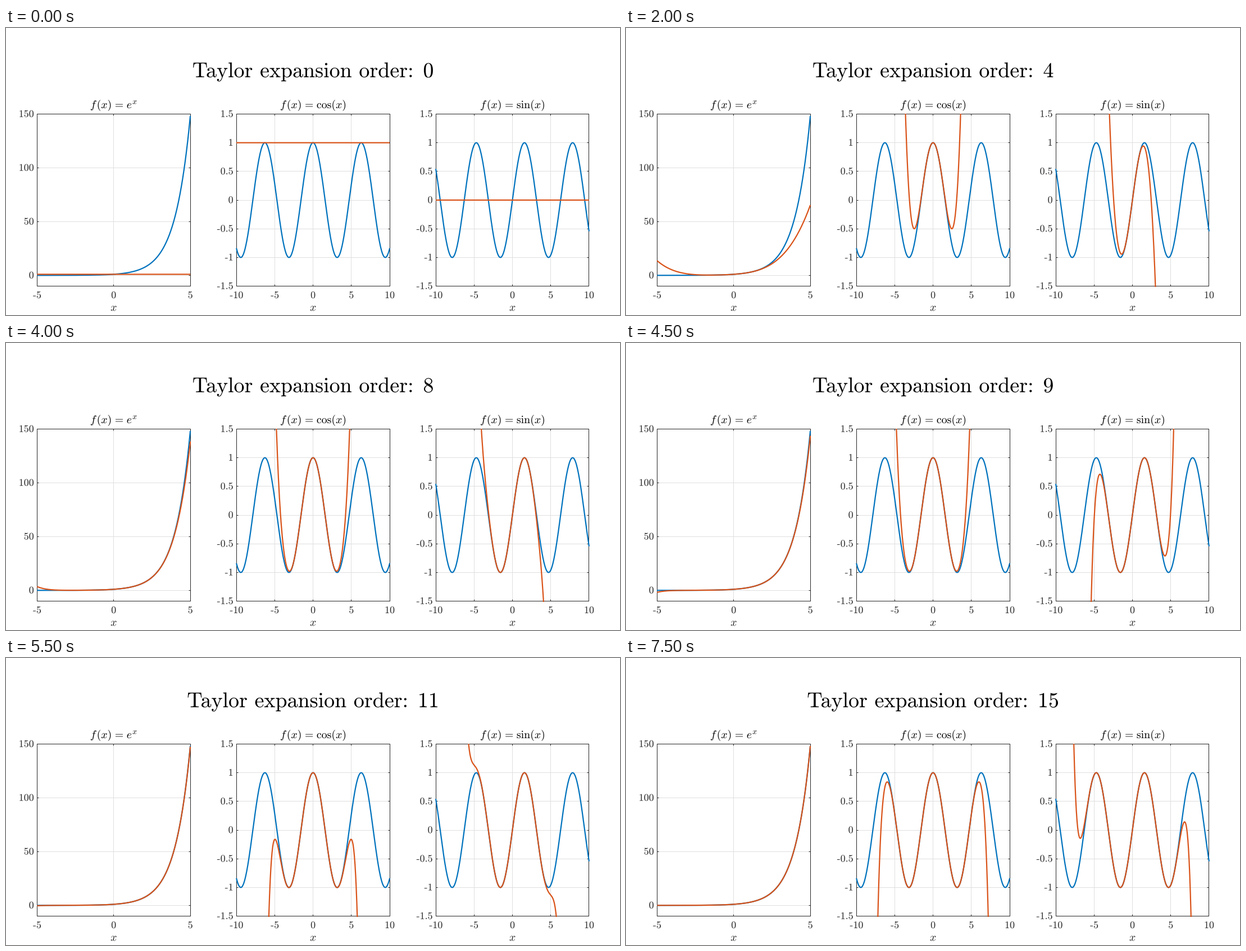
Animation, 1093 px wide and 512 px high, one loop 8 s. Source, as a matplotlib script:

```python
import math

import matplotlib.pyplot as plt
import numpy as np
from matplotlib.animation import FuncAnimation
from matplotlib.patches import PathPatch, Rectangle
from matplotlib.path import Path
from matplotlib.textpath import TextPath
from matplotlib.transforms import Affine2D

WIDTH, HEIGHT, DPI = 1093, 512, 64
PX = 72 / DPI
TOP, BOTTOM = 153.5, 460.5
LEFT, STEP, PANEL_WIDTH = 55.2, 354.92, 272.93
BLUE, ORANGE, INK, GRID = "#0072BD", "#D95319", "#262626", "#DFDFDF"
TITLE_EM, HEAD_EM, TICK_EM = 38, 19.8, 18
ORDERS = 16

plt.rcParams["mathtext.fontset"] = "cm"
fig = plt.figure(figsize=(WIDTH / DPI, HEIGHT / DPI), dpi=DPI, facecolor="white")
ax = fig.add_axes([0, 0, 1, 1])
ax.set(xlim=(0, WIDTH), ylim=(HEIGHT, 0))
ax.axis("off")


def glyphs(markup):
    """Outline of a math string, one unit per em, baseline at zero."""
    outline = TextPath((0, 0), f"${markup}$", size=100)
    return outline.transformed(Affine2D().scale(0.01))


def number(text):
    """Outline of a number, with a hyphen as its minus sign."""
    if not text.startswith("-"):
        return glyphs(rf"\text{{{text}}}")
    bar = Affine2D().scale(0.265, 0.058).translate(0.011, 0.187)
    digits = glyphs(rf"\text{{{text[1:]}}}").transformed(Affine2D().translate(0.333, 0))
    return Path.make_compound_path(Path.unit_rectangle().transformed(bar), digits)


def placed(outline, x, y, em, align=0.5, ruler=None):
    """Move an outline so that its ruler sits at x; align 0.5 centres, 1 ends there."""
    box = (ruler or outline).get_extents()
    shift = box.x0 + align * box.width
    move = Affine2D().translate(-shift, 0).scale(em, -em).translate(x, y)
    return outline.transformed(move)


def write(path, color):
    return ax.add_patch(PathPatch(path, facecolor=color, linewidth=0, zorder=4, snap=False))


def write_number(value, x, y, align=0.5):
    text = f"{value:g}"
    zeros = "".join("0" if c.isdigit() else c for c in text)
    write(placed(number(text), x, y, TICK_EM, align, number(zeros)), INK)


def stroke(xs, ys, color, width=1, zorder=1, cap="butt"):
    # Coordinates are already on pixel centres where that matters.
    line, = ax.plot(xs, ys, color=color, lw=width * PX, zorder=zorder, snap=False,
                    solid_capstyle=cap, solid_joinstyle="miter")
    return line


def crisp(v):
    return math.floor(v) + 0.5


def taylor(derivatives, order, x):
    return sum(derivatives[k % 4] * x**k / math.factorial(k) for k in range(order + 1))


class Panel:
    def __init__(self, index, func, derivatives, name, xticks, yticks, ylim):
        self.left = LEFT + STEP * index
        self.right = self.left + PANEL_WIDTH
        self.xlim, self.ylim = (xticks[0], xticks[-1]), ylim
        self.derivatives = derivatives
        self.x = np.linspace(*self.xlim, 500)
        self.draw_frame(xticks, yticks)

        centre = (self.left + self.right) / 2
        head = rf"f\hspace{{0.12}}(x)\hspace{{0.117}}=\hspace{{0.117}}{name}"
        write(placed(glyphs(head), centre, 143, HEAD_EM), "black")
        write(placed(glyphs("x"), centre, 504.5, HEAD_EM), INK)

        self.curve(func(self.x), BLUE, 2)
        self.series = self.curve(self.approximation(0), ORANGE, 3)

    def to_x(self, v):
        lo, hi = self.xlim
        return self.left + (v - lo) / (hi - lo) * PANEL_WIDTH

    def to_y(self, v):
        lo, hi = self.ylim
        return BOTTOM - (v - lo) / (hi - lo) * (BOTTOM - TOP)

    def draw_frame(self, xticks, yticks):
        left, right = crisp(self.left), crisp(self.right)
        for v in xticks:
            x = crisp(self.to_x(v))
            stroke([x, x], [TOP, BOTTOM], GRID, zorder=0)
            for y, inward in ((TOP, 3), (BOTTOM, -3)):
                stroke([x, x], [y, y + inward], INK)
            write_number(v, self.to_x(v), 482)
        for v in yticks:
            y = crisp(self.to_y(v))
            stroke([left, right], [y, y], GRID, zorder=0)
            for x, inward in ((left, 3), (right, -3)):
                stroke([x, x + inward], [y, y], INK)
            write_number(v, self.left - 6.2, self.to_y(v) + 5.3, align=1)
        stroke([left, right, right, left, left],
               [TOP, TOP, BOTTOM, BOTTOM, TOP], INK, cap="projecting")

    def curve(self, values, color, zorder):
        line = stroke(self.to_x(self.x), self.to_y(values), color, 2.2, zorder)
        line.set_clip_path(Rectangle((self.left - 1, TOP - 1), PANEL_WIDTH + 2,
                                     BOTTOM - TOP + 2, transform=ax.transData))
        return line

    def approximation(self, order):
        return taylor(self.derivatives, order, self.x) + 0 * self.x

    def show(self, order):
        self.series.set_ydata(self.to_y(self.approximation(order)))


def title_markup(digits):
    return (r"\text{T}\hspace{-0.095}\text{aylor}\hspace{0.379}\text{expansion}"
            r"\hspace{0.379}\text{order:}\hspace{0.506}\text{" + digits + "}")


def title_path(order):
    text = str(order)
    ruler = glyphs(title_markup("0" * len(text)))
    return placed(glyphs(title_markup(text)), WIDTH / 2, 88, TITLE_EM, ruler=ruler)


wide = range(-10, 11, 5)
waves = np.arange(-1.5, 1.6, 0.5)
panels = [
    Panel(0, np.exp, (1, 1, 1, 1), "e^x", (-5, 0, 5), (0, 50, 100, 150), (-10, 150)),
    Panel(1, np.cos, (1, 0, -1, 0), r"\text{cos}(x)", wide, waves, (-1.5, 1.5)),
    Panel(2, np.sin, (0, 1, 0, -1), r"\text{sin}(x)", wide, waves, (-1.5, 1.5)),
]
title = write(title_path(0), "black")


def update(order):
    title.set_path(title_path(order))
    for panel in panels:
        panel.show(order)
    return [title, *(panel.series for panel in panels)]


anim = FuncAnimation(fig, update, frames=ORDERS, interval=500, repeat=True, repeat_delay=0)
plt.show()
```
